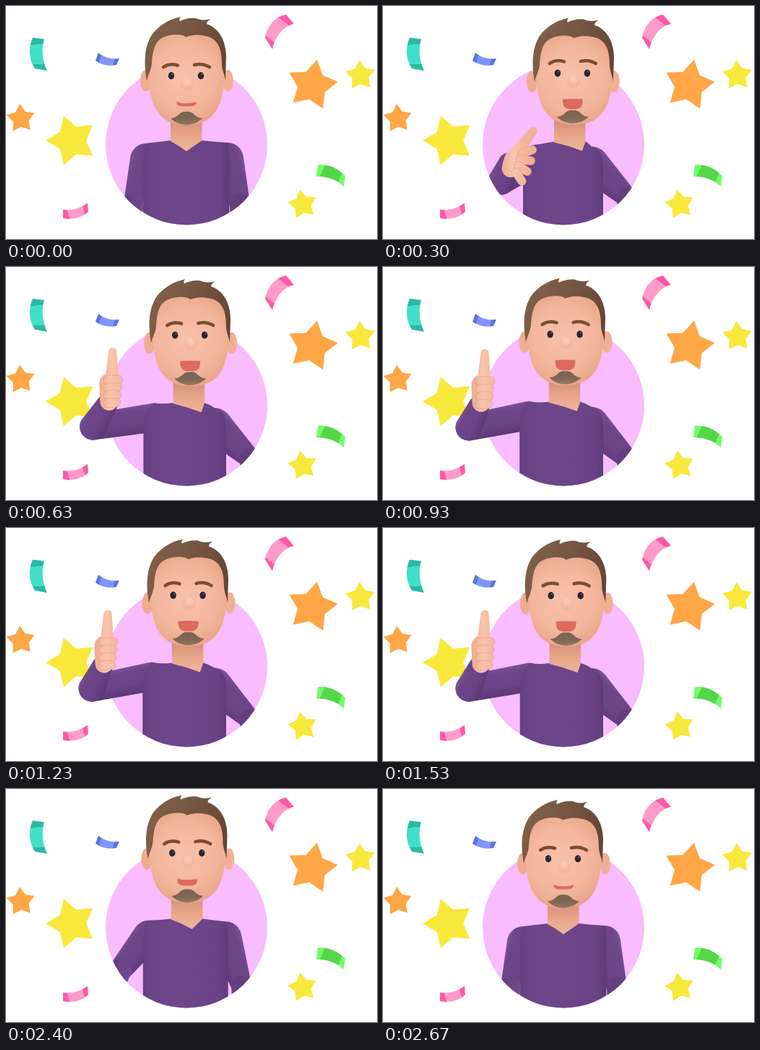
An HTML page with a canvas for the animation above (2.7 s loop, 514 px wide and 324 px high).

```html
<!DOCTYPE html>
<html lang="en">
<head>
<meta charset="utf-8">
<title>Thumbs up</title>
<style>
html, body { margin: 0; width: 100%; height: 100%; overflow: hidden; background: #fff; }
canvas { display: block; width: 514px; height: 324px; }
</style>
</head>
<body>
<canvas id="stage" width="514" height="324"></canvas>
<script>
const ctx = document.getElementById('stage').getContext('2d');
const LOOP = 2700, TAU = Math.PI * 2;

// sway and bob move the head, cheer opens the mouth and turns the body,
// (ex, ey) is the raised arm's elbow, (wx, wy) its cuff, fist closes the hand
const rest = { sway: 0, bob: 0, cheer: 0, ex: 177, ey: 275, wx: 165, wy: 350, fist: 0 };
const reach = { sway: 15, bob: 1.5, cheer: 1, ex: 164, ey: 244, wx: 174, wy: 219, fist: 0 };
const thumb = { sway: 6.5, bob: 2, cheer: 1, ex: 121, ey: 222, wx: 141, wy: 191, fist: 1 };
const settle = { ...thumb, sway: 3, bob: .5, ex: 119, ey: 223, wx: 133, wy: 193 };
const hold = { ...settle, sway: 4.3, bob: 1 };
const lower = { ...hold, bob: -2, cheer: .8, ex: 140, ey: 240, wx: 150, wy: 235, fist: .3 };
const down = { ...rest, sway: 1.5, bob: -6.5, cheer: .4, ex: 158, ey: 252, wx: 125, wy: 330 };

const keys = [[0, rest], [300, reach], [600, thumb], [930, settle], [1200, settle], [1530, hold],
              [2070, hold], [2220, lower], [2400, down], [2580, rest], [LOOP, rest]];

const mix = (a, b, u) => a + (b - a) * u;

// Smooth interpolation that never overshoots its keys
function poseAt(t) {
  let i = 0;
  while (i < keys.length - 2 && t >= keys[i + 1][0]) i++;
  const slope = (k, name) => k < 0 || k > keys.length - 2 ? 0
    : (keys[k + 1][1][name] - keys[k][1][name]) / (keys[k + 1][0] - keys[k][0]);
  const tangent = (k, name) => {
    const a = slope(k - 1, name), b = slope(k, name);
    return a * b > 0 ? 2 * a * b / (a + b) : 0;
  };
  const [t0, from] = keys[i], [t1, to] = keys[i + 1];
  const h = t1 - t0, u = (t - t0) / h, v = 1 - u, pose = {};
  for (const n in from) {
    pose[n] = from[n] * v * v * (1 + 2 * u) + to[n] * u * u * (3 - 2 * u)
      + h * u * v * (v * tangent(i, n) - u * tangent(i + 1, n));
  }
  return pose;
}

function stops(g, list) {
  for (const [at, color] of list) g.addColorStop(at, color);
  return g;
}
const linear = (x0, y0, x1, y1, ...list) => stops(ctx.createLinearGradient(x0, y0, x1, y1), list);
const radial = (x, y, r, ...list) => stops(ctx.createRadialGradient(x, y, 0, x, y, r), list);

function fill(path, color) {
  ctx.fillStyle = color;
  ctx.fill(path);
}

function ellipse(x, y, rx, ry, color) {
  const p = new Path2D();
  p.ellipse(x, y, rx, ry, 0, 0, TAU);
  fill(p, color);
}

// Hull of two circles
function limb(x1, y1, r1, x2, y2, r2) {
  const a = Math.atan2(y2 - y1, x2 - x1), d = Math.hypot(x2 - x1, y2 - y1) || 1;
  const k = Math.acos(Math.max(-1, Math.min(1, (r1 - r2) / d)));
  const p = new Path2D();
  p.arc(x1, y1, r1, a + k, a - k + TAU);
  p.arc(x2, y2, r2, a - k, a + k);
  p.closePath();
  return p;
}

function sleeve(x1, y1, r1, x2, y2, r2, side) {
  const a = Math.atan2(y2 - y1, x2 - x1), r = Math.max(r1, r2) * side;
  const nx = -Math.sin(a) * r, ny = Math.cos(a) * r;
  const mx = (x1 + x2) / 2, my = (y1 + y2) / 2;
  fill(limb(x1, y1, r1, x2, y2, r2), linear(mx - nx, my - ny, mx + nx, my + ny,
    [0, '#785394'], [.2, '#6d4589'], [.65, '#6b4387'], [1, '#5a3875']));
}

function star(x, y, r, turn, color) {
  const p = new Path2D();
  for (let i = 0; i < 10; i++) {
    const a = (turn + i * 36 - 90) * Math.PI / 180, q = i % 2 ? r * .56 : r;
    p.lineTo(x + q * Math.cos(a), y + q * Math.sin(a));
  }
  fill(p, color);
}

function ribbon(shape, axis, mid, end) {
  fill(new Path2D(shape), linear(...axis, [0, end], [.2, end], [.2, mid], [.8, mid], [.8, end], [1, end]));
}

function confetti() {
  const orange = '#ffa647', yellow = '#f9e83c', pink = '#ff9bc9', rose = '#fb59a5';
  star(424, 110, 36, 11, orange);
  star(20.5, 156.5, 20.5, -4, orange);
  star(91, 187, 36, -18, yellow);
  star(491, 96.5, 21.5, -3, yellow);
  star(411, 276, 21, -10, yellow);
  ribbon('M37 44L53 46C49 58 50 75 57 90L40 87C31 73 31 57 37 44Z', [45,44, 48,90], '#41dfc8', '#2bb9a5');
  ribbon('M128 65C138 73 147 74 157 73L153 82C143 84 132 82 124 76Z', [125,69, 156,78], '#7f95fb', '#5a73de');
  ribbon('M359 44C362 28 372 15 388 12L399 25C386 27 374 40 369 60Z', [362,56, 394,16], pink, rose);
  ribbon('M432 221C447 219 460 226 470 236L468 251C458 241 444 237 430 237Z', [430,226, 470,244], '#55d648', '#70fc66');
  ribbon('M79 283C92 285 103 281 113 274L114 286C106 294 92 298 79 295Z', [79,290, 114,280], pink, rose);
}

function disc() {
  const p = new Path2D();
  p.arc(250, 192.5, 112, 0, TAU);
  return p;
}

const leftShoulder = ({ sway, bob, cheer }) =>
  [194 + 1.1 * sway + 4 * cheer, 213 + bob - 8 * cheer + .4 * sway, 22 - 2 * cheer];

function torso(pose) {
  const { sway, bob, cheer } = pose, lean = cheer * cheer;
  const nx = 250 + .6 * sway, ny = 187 + bob;
  const nl = nx - 22, nr = nx + 21.5;
  const vx = nx + 17 * cheer, vy = ny + 15 - 2 * cheer;
  const xl = 190 + .4 * sway - 2 * cheer, xr = 309.5 - 4.5 * cheer;
  const [lx, ly, lr] = leftShoulder(pose);
  const rx = 307 - 18 * lean, ry = 212 + bob + 6 * lean, rr = 22 + 2 * lean;
  const fx = 324 + 14 * lean, fy = 275 - 9 * lean;

  sleeve(rx, ry, rr, fx, fy, 14, 1);
  fill(limb(fx, fy, 14, fx + 3, fy + 60, 14), '#633f7e');

  const trunk = new Path2D();
  trunk.moveTo(nl, ny);
  trunk.quadraticCurveTo((nl + lx) / 2, ny + 2, lx, ly - lr);
  trunk.quadraticCurveTo(xl, ly - 8, xl, ly + 12);
  trunk.lineTo(xl, 320);
  trunk.lineTo(xr, 320);
  trunk.lineTo(xr, ry + 6);
  trunk.quadraticCurveTo(xr, ry - rr + 4, rx, ry - rr);
  trunk.quadraticCurveTo((nr + rx) / 2, ny + 2, nr, ny);
  fill(trunk, linear(xl, 0, xr, 0, [0, '#654181'], [.08, '#6b4387'], [.4, '#6e468a'], [.9, '#6a4286'], [1, '#5e3b79']));

  const neck = new Path2D();
  neck.moveTo(nl, ny - 40);
  neck.lineTo(nl, ny + 1);
  neck.quadraticCurveTo((nl + vx) / 2, (ny + vy) / 2 - 1, vx, vy);
  neck.quadraticCurveTo((nr + vx) / 2, (ny + vy) / 2, nr, ny);
  neck.lineTo(nr, ny - 40);
  fill(neck, linear(0, ny - 26, 0, vy, [0, '#d8927a'], [.45, '#e6a68a'], [1, '#efb59a']));
}

function hand({ wx, wy, fist }) {
  ctx.save();
  ctx.translate(wx, wy);
  const skin = linear(-10, 0, 28, 0, [0, '#ecac90'], [.4, '#f8c5ac'], [1, '#f0b196']);
  fill(limb(mix(34, 8, fist), mix(-45, -73, fist), 5.7, mix(12, 7, fist), mix(-16, -40, fist), 8.7), skin);
  fill(limb(mix(8, 4, fist), mix(-4, -29, fist), 14.5, 3, mix(7, -4, fist), 12.5), skin);
  ctx.strokeStyle = 'rgba(200,120,95,.4)';
  ctx.lineWidth = 1.4;
  for (let i = 0; i < 4; i++) {
    const x = mix(20 - 3 * i, 2, fist), y = mix(9 * i - 14, 10.7 * i - 34, fist);
    const a = mix(.45 * i - .35, -.05, fist), long = 14 - i * fist;
    const finger = limb(x, y, 6.3, x + long * Math.cos(a), y + long * Math.sin(a), 5.7);
    ctx.stroke(finger);
    fill(finger, skin);
  }
  ctx.restore();
}

const hair = new Path2D('M195 104C191 80 191 58 202 40C212 27 224 19 242 15Q239 19 241 21C247 18 255 16 263 17C269 20 276 20 284 18Q278 21 278 25C296 31 305 50 305 70L304 104C303 95 299 90 299 80C299 60 294 46 278 42C262 38 254 42 249 43C244 38 225 39 215 45C204 52 203 68 202 80C201 90 197 95 195 104Z');
const goatee = new Path2D('M228 156C237 156 240 148 246 147L254 147C260 148 263 156 272 156C266 162 258 165.500 250 165.500C241 165.500 234 162 228 156Z');
const brows = new Path2D('M218 85Q227 79 238 82.500M261 82Q272 79 282 85');

function head({ sway, bob, cheer }) {
  const fx = -.14 * sway, fy = -3.6 * cheer - .1 * sway;
  const chin = 166 + fy * .5, low = 139.5 + 7.5 * cheer;
  ctx.save();
  ctx.translate(sway, bob);
  ellipse(193.5 + fx, 104, 7.5, 15, '#eeac90');
  ellipse(307.5 + fx, 104, 7.5, 15, '#f0b096');
  fill(new Path2D(`M198 95C198 135 210 ${chin} 250 ${chin}C290 ${chin} 302 135 302 95C302 55 296 36 250 36C204 36 198 55 198 95Z`),
    radial(246, 98, 78, [0, '#f7c2aa'], [.55, '#f3b79d'], [.82, '#eaa88b'], [1, '#df9a7c']));
  fill(hair, linear(195, 20, 305, 70, [0, '#82624b'], [.5, '#765641'], [1, '#644536']));

  ctx.save();
  ctx.translate(fx, fy * .7);
  fill(goatee, linear(0, 147, 0, 165, [0, '#7b6353'], [.6, '#7f6756'], [1, '#98795f']));
  ctx.restore();

  ctx.translate(fx, fy);
  ellipse(251, 108, 9, 10, radial(251, 105, 11, [0, '#fbcdb6'], [.5, '#f7c1a8'], [1, 'rgba(236,168,140,.3)']));
  for (const x of [229, 270]) {
    ellipse(x, 97, 4.2, 5, '#2b2430');
    ellipse(x + 1.2, 95, 1, 1.2, '#6d6470');
  }
  fill(new Path2D(`M236 133Q250 ${138 - 6 * cheer} 264 133C264 ${low} 258 ${low} 250 ${low}C242 ${low} 236 ${low} 236 133Z`), '#dd6a5e');
  ctx.translate(0, -1.5 * cheer);
  ctx.strokeStyle = '#7b4d31';
  ctx.lineWidth = 4.5;
  ctx.lineCap = 'round';
  ctx.stroke(brows);
  ctx.restore();
}

function draw(t) {
  const pose = poseAt(t), { ex, ey, wx, wy, cheer } = pose;
  const er = 14 + 4.5 * cheer;
  const free = t > 370 && t < 2250;
  const clipped = paint => {
    ctx.save();
    ctx.clip(disc());
    paint();
    ctx.restore();
  };
  const arm = paint => free ? paint() : clipped(paint);

  ctx.clearRect(0, 0, 514, 324);
  confetti();
  fill(disc(), '#f8bcff');
  arm(() => sleeve(...leftShoulder(pose), ex, ey, er, -1));
  clipped(() => torso(pose));
  arm(() => {
    sleeve(ex, ey, er, wx, wy, 14.5, 1);
    hand(pose);
  });
  head(pose);
}

function tick() {
  draw(performance.now() % LOOP);
  requestAnimationFrame(tick);
}
tick();
</script>
</body>
</html>
```
